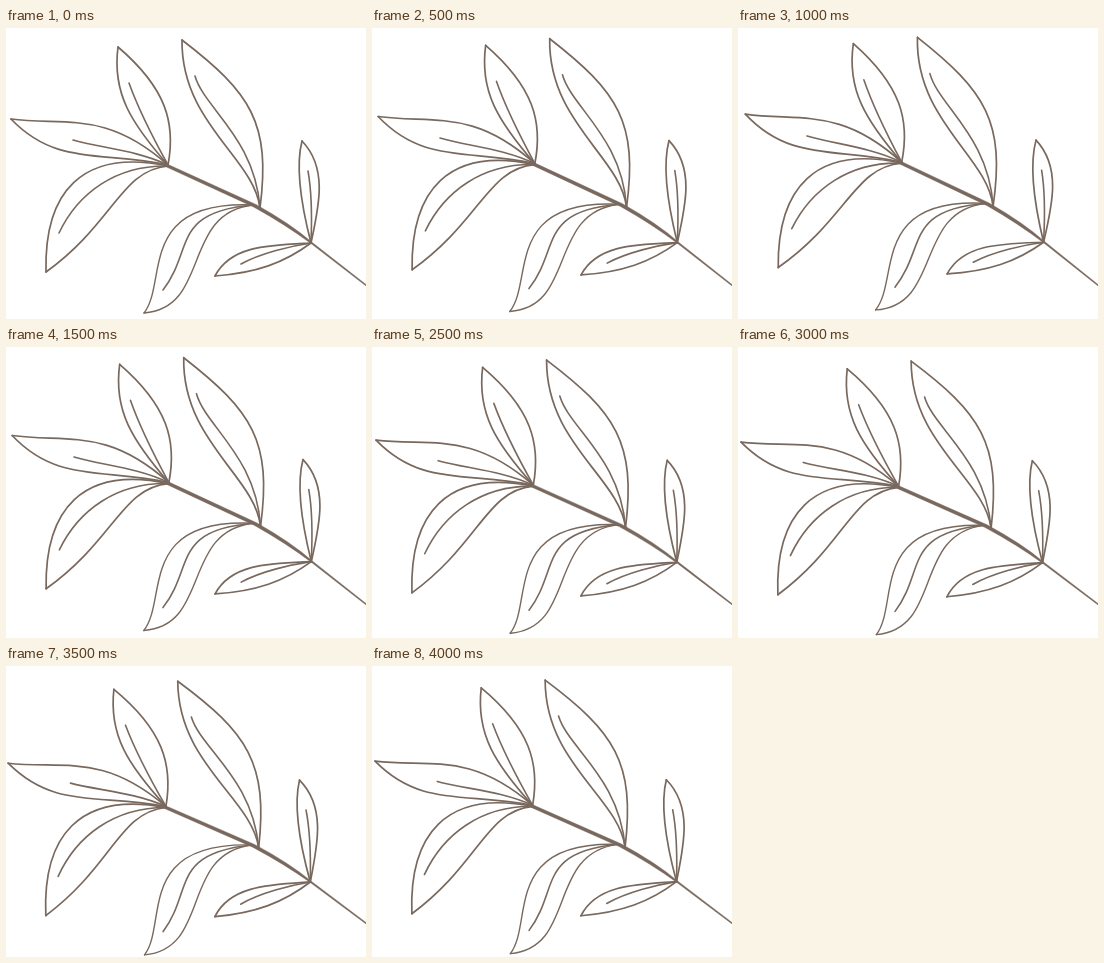
Recreate the animation shown at these times as an HTML page. Size 360x291 px, loop 5000 ms.

```html
<!DOCTYPE html>
<html lang="en">
<head>
<meta charset="utf-8">
<title>Swaying branch</title>
<style>
  html, body { margin: 0; width: 100%; height: 100%; overflow: hidden; background: #fff; }
  svg { display: block; width: 100%; height: 100%; }
  path { fill: none; stroke: #78685d; stroke-linecap: round; stroke-linejoin: round; }
  .stem { fill: #78685d; stroke-width: .4; }
</style>
</head>
<body>
<svg viewBox="0 0 360 291">
  <g id="branch">
    <path class="stem" d="M160 135.5L250 176.5Q285 196 306 214.3L370 264.3L369.5 265.2L305 215.6Q280 197 248 179.2L160 138.8Z"/>
  </g>
</svg>
<script>
const branch = document.getElementById('branch');

// Each leaf: base, tip, controls of both edges (from the base), vein end and its controls.
const leaves = [
  { base: '162 137', tip: '5 91', edges: ['100 82 60 98', '95 123 50 138'], end: '67 112', vein: '130 122 95 120' },
  { base: '162 138', tip: '40 244', edges: ['75 120 38 165', '115 142 108 195'], end: '53 205', vein: '110 137 72 165' },
  { base: '162 137', tip: '112 19', edges: ['125 95 106 65', '170 95 160 60'], end: '123 55', vein: '146 108 133 83' },
  { base: '254 180', tip: '176 12', edges: ['248 130 175 95', '265 95 245 65'], end: '189 48', vein: '249 110 198 80' },
  { base: '247 177', tip: '138 285', edges: ['130 172 162 255', '175 185 205 280'], end: '157 262', vein: '165 184 188 222', width: 1.4 },
  { base: '305 215', tip: '209 248', edges: ['265 217 225 217', '278 235 250 245'], end: '235 236', vein: '285 218 255 225' },
  { base: '305 215', tip: '296 113', edges: ['296 180 289 140', '313 178 322 140'], end: '302 143', vein: '306 190 306 165' }
];

function addCurve(from, controls, to, width) {
  const path = document.createElementNS('http://www.w3.org/2000/svg', 'path');
  path.setAttribute('d', `M${from}C${controls} ${to}`);
  path.setAttribute('stroke-width', width);
  branch.append(path);
}

for (const { base, tip, edges, end, vein, width = 1.7 } of leaves) {
  edges.forEach(edge => addCurve(base, edge, tip, width));
  addCurve(base, vein, end, 1.6);
}

// The branch turns about the cut end of its stem, one pose per half second.
const angles = [0, .4, .8, .4, 0, -.33, -.67, -1, -.67, -.67];

function draw() {
  const pose = Math.floor(performance.now() % 5000 / 500);
  branch.setAttribute('transform', `rotate(${angles[pose]} 360 257)`);
  requestAnimationFrame(draw);
}
draw();
</script>
</body>
</html>
```
